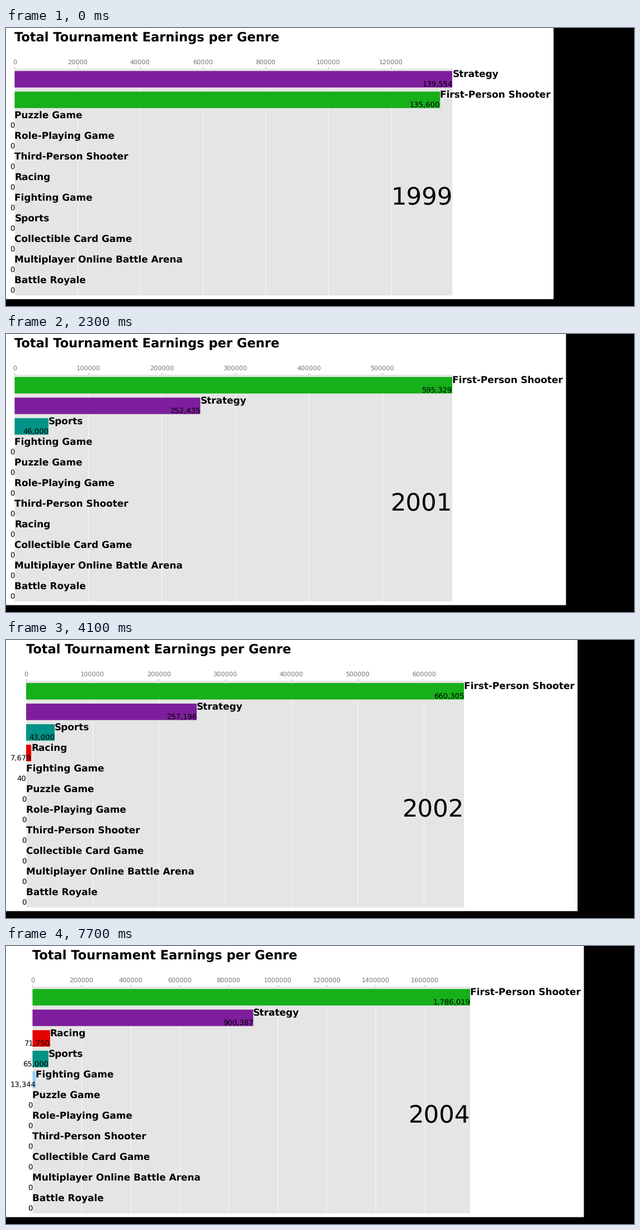
Animation of 1123 by 499 pixels, one loop 8000 ms. Source, as a matplotlib script:

```python
import matplotlib.pyplot as plt
import numpy as np
from matplotlib.animation import FuncAnimation
from matplotlib.patches import Rectangle

W, H, DPI = 1123, 499, 64
ZOOM = 0.9355                 # chart scale on the stage
PT = ZOOM * 72 / DPI          # chart points to figure points
TOP, BOTTOM, WIDTH = 73.2, 480.3, 783.0
PAGE_H, LABEL_W = 486.7, 203  # page height, room for the longest name
SINK = 0.01                   # labels sit slightly below the row centre

FPS, STR, SPO, RAC = "First-Person Shooter", "Strategy", "Sports", "Racing"
FIG, PUZ, RPG = "Fighting Game", "Puzzle Game", "Role-Playing Game"
TPS, CCG = "Third-Person Shooter", "Collectible Card Game"
MOBA, ROY = "Multiplayer Online Battle Arena", "Battle Royale"

COLORS = {FPS: "#15b01a", STR: "#7e1e9c", SPO: "#029386",
          RAC: "#e50000", FIG: "#95d0fc"}
REST = [FIG, PUZ, RPG, TPS, RAC, CCG, MOBA, ROY]

# year, left edge of the chart, tick step, leading genres
YEARS = [
    (1999, 15.4, 20000, {STR: 139554, FPS: 135600, PUZ: 0, RPG: 0, TPS: 0,
                         RAC: 0, FIG: 0, SPO: 0}),
    (2000, 15.4, 50000, {FPS: 439001, STR: 256306, SPO: 50000}),
    (2001, 15.4, 100000, {FPS: 595329, STR: 252435, SPO: 46000}),
    (2002, 36.0, 100000, {FPS: 660305, STR: 257196, SPO: 43000, RAC: 7679,
                          FIG: 40}),
    (2003, 37.9, 200000, {FPS: 1133765, STR: 545793, SPO: 55566, FIG: 29550,
                          RAC: 9925}),
    (2004, 47.4, 200000, {FPS: 1786019, STR: 900387, RAC: 71750, SPO: 65000,
                          FIG: 13344}),
]
FRAMES, INTERVAL = 80, 100
CHANGES = [5, 23, 41, 59, 77]

plt.rcParams["font.family"] = "DejaVu Sans"
plt.rcParams["text.hinting"] = "none"
fig = plt.figure(figsize=(W / DPI, H / DPI), dpi=DPI, facecolor="black")
page = Rectangle((0, H - PAGE_H), W, PAGE_H, fc="white", lw=0, snap=False,
                 transform=None, zorder=-1)
fig.add_artist(page)
ax = fig.add_axes([0, 0, 1, 1])


def style_axes(top, step, rows):
    ax.set_facecolor("#e5e5e5")
    ax.set_xlim(0, top)
    ax.set_ylim(-0.508, rows - 0.492)
    ticks = np.arange(0, top, step)
    ax.set_xticks(ticks, [str(t) for t in ticks])
    ax.set_yticks([])
    ax.tick_params(axis="x", top=True, labeltop=True, bottom=False,
                   labelbottom=False, colors="#777777", labelsize=12 * PT,
                   length=3.5 * PT, width=0.8 * PT, pad=3.5 * PT)
    ax.grid(axis="x", color="white", lw=0.8 * PT, ls="-")
    ax.set_axisbelow(True)
    for spine in ax.spines.values():
        spine.set_visible(False)


def draw(i):
    year, left, step, lead = YEARS[np.searchsorted(CHANGES, i, side="right")]
    data = {**lead, **{name: 0 for name in REST if name not in lead}}
    top = max(data.values())

    ax.clear()
    ax.set_position([left / W, 1 - BOTTOM / H, WIDTH / W, (BOTTOM - TOP) / H])
    style_axes(top, step, len(data))
    page.set_width(left + WIDTH * data[FPS] / top + LABEL_W)

    for row, (name, value) in enumerate(data.items()):
        y = len(data) - 1 - row
        if value:
            ax.barh(y, value, height=0.8, color=COLORS[name], snap=False)
        ax.text(value, y - SINK, name, size=18 * PT, weight="bold",
                ha="left", va="bottom")
        ax.text(value, y - 0.25 - SINK, f"{value:,}", size=14 * PT,
                ha="right", va="center")
    ax.set_xlim(0, top)

    ax.text(1, 0.4, str(year), transform=ax.transAxes, size=46.4 * PT,
            ha="right")
    ax.text(0, 1.12, "Total Tournament Earnings per Genre",
            transform=ax.transAxes, size=24.1 * PT, weight="bold", ha="left")
    return []


anim = FuncAnimation(fig, draw, frames=FRAMES, interval=INTERVAL,
                     init_func=lambda: draw(0), repeat=True, repeat_delay=0)
plt.show()
```
